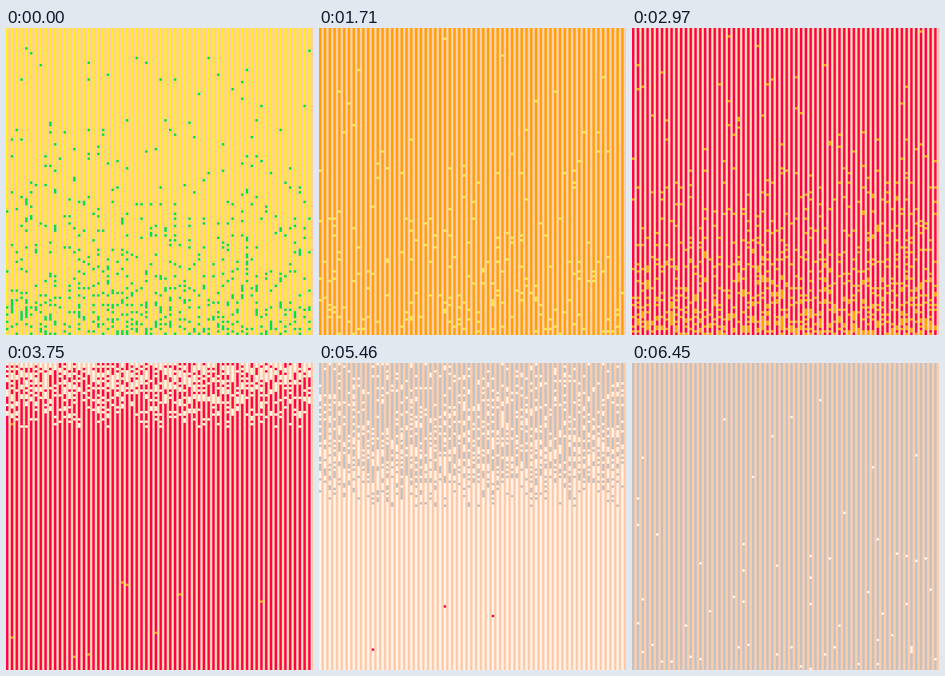
Write an HTML page with a canvas that moves like this. It is 384 px wide and 384 px high and loops after 6480 ms.

```html
<!DOCTYPE html>
<html lang="en">
<head>
<meta charset="utf-8">
<title>Raining colour stripes</title>
<style>
  html, body { margin: 0; width: 100%; height: 100%; overflow: hidden; background: #ffccaa; }
  canvas { display: block; width: 100vw; height: 100vh; image-rendering: pixelated; }
</style>
</head>
<body>
<canvas id="stage" width="384" height="384"></canvas>
<script>
const ctx = document.getElementById('stage').getContext('2d');

const CELL = 3, COLS = 64, ROWS = 128;
const STEP = 30, FRAMES = 216;
const GAP = '#ffccaa';
const COLOURS = ['#00e436', '#ffec27', '#ffa300', '#ff004d', '#fff1e8', '#c2c3c7'];

const PERIOD = 50.35;  // frames between two colour fronts
const SPEED = 5.04;    // rows a front falls per frame
const START = -31.3;   // frame at which the yellow front enters
const CHANCE = 0.155;  // share of cells repainted each frame

// Seeded noise in [0, 1)
function noise(cell, frame) {
  let h = Math.imul(cell + 1, 0x9e3779b1) ^ Math.imul(frame + 1000, 0x85ebca6b);
  h = Math.imul(h ^ (h >>> 16), 0x7feb352d);
  h = Math.imul(h ^ (h >>> 15), 0x846ca68b);
  return ((h ^ (h >>> 16)) >>> 0) / 4294967296;
}

function lastPaint(cell, frame) {
  while (noise(cell, frame) >= CHANCE) frame--;
  return frame;
}

function colourAt(row, frame) {
  const level = Math.floor((frame - START - row / SPEED) / PERIOD) + 1;
  return COLOURS[Math.max(0, Math.min(COLOURS.length - 1, level))];
}

function draw(frame) {
  ctx.fillStyle = GAP;
  ctx.fillRect(0, 0, 384, 384);
  for (let row = 0; row < ROWS; row++) {
    for (let col = 0; col < COLS; col++) {
      ctx.fillStyle = colourAt(row, lastPaint(row * COLS + col, frame));
      ctx.fillRect(col * CELL * 2, row * CELL, CELL, CELL);
    }
  }
}

const begin = performance.now();
let shown = -1;

function tick() {
  const frame = Math.floor((performance.now() - begin) / STEP) % FRAMES;
  if (frame !== shown) draw(shown = frame);
  requestAnimationFrame(tick);
}
tick();
</script>
</body>
</html>
```
